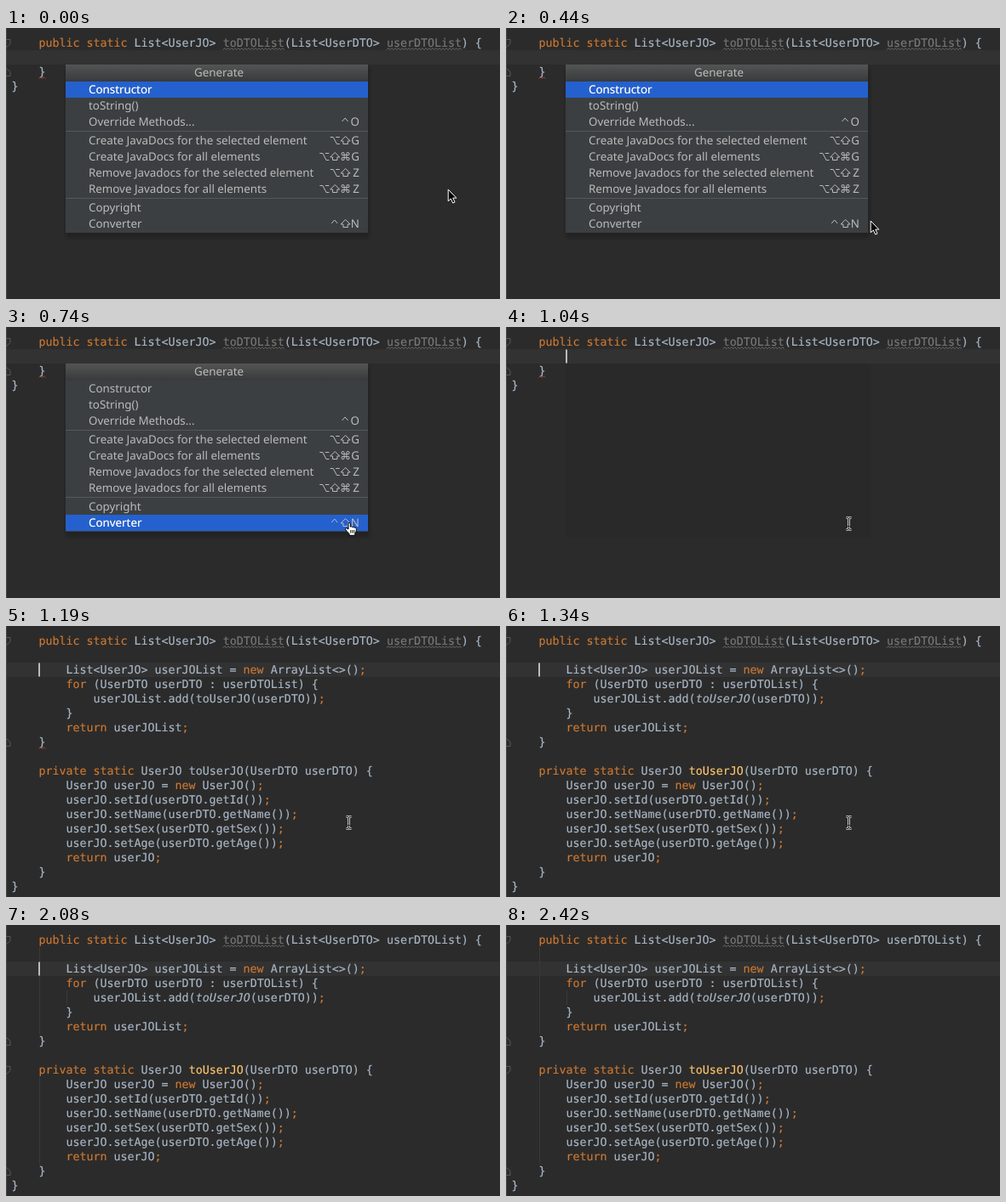
Animation of 580x319 px, one loop 2520 ms. Source, as an HTML page:

```html
<!DOCTYPE html>
<html lang="en">
<head>
<meta charset="utf-8">
<title>Generate converter</title>
<style>
html, body { margin: 0; width: 100%; height: 100%; overflow: hidden; background: #2b2b2b; }
svg { display: block; width: 580px; height: 319px; }
text { white-space: pre; text-rendering: geometricPrecision; }
.code { font: 13.305px "DejaVu Sans Mono", monospace; color: #a9b7c6; }
.code, .code .key { fill: currentColor; stroke: currentColor; stroke-width: .15; }
.code .key { color: #cc7832; }
.code.unused { color: #787878; }
.code.call { font-style: italic; }
.code.name { color: #ffc66d; }
.menu { font: 13.35px "Noto Sans", sans-serif; fill: #bbb; }
.sign { font: 13px "DejaVu Sans", sans-serif; fill: #bbb; text-anchor: middle; }
.end { text-anchor: end; }
.mid { text-anchor: middle; }
</style>
</head>
<body>
<svg id="stage" viewBox="0 0 580 319">
  <defs>
    <linearGradient id="bar" x2="0" y2="1">
      <stop stop-color="#535454"/><stop offset="1" stop-color="#393a3b"/>
    </linearGradient>
    <filter id="soft" x="-5%" y="-5%" width="110%" height="112%">
      <feGaussianBlur stdDeviation="1.5"/>
    </filter>
  </defs>
</svg>
<script>
const LOOP = 2520, LINE = 17, CHAR = 8.01;
const stage = document.getElementById('stage');

function add(parent, tag, attrs = {}, content) {
  const node = document.createElementNS('http://www.w3.org/2000/svg', tag);
  for (const key in attrs) node.setAttribute(key, attrs[key]);
  if (content !== undefined) node.textContent = content;
  parent.append(node);
  return node;
}

// A group that is visible only from start to end, with hard cuts.
function during(start, end = LOOP) {
  const group = add(stage, 'g');
  const steps = [[0, start === 0], [start, true], [end, false], [LOOP, end === LOOP]]
    .filter(([t], i) => i === 0 || i === 3 || (t > 0 && t < LOOP));
  group.animate(
    steps.map(([t, on]) => ({ offset: t / LOOP, opacity: +on, easing: 'step-end' })),
    { duration: LOOP, iterations: Infinity });
  return group;
}

const rect = (parent, x, y, width, height, fill, more) =>
  add(parent, 'rect', { x, y, width, height, fill, ...more });
const path = (parent, d, stroke, more) =>
  add(parent, 'path', { d, stroke, fill: 'none', ...more });
const colX = col => 6.4 + col * CHAR;
const rowY = row => 9 + row * LINE;

function code(parent, col, row, source, style = '') {
  const line = add(parent, 'text', { class: 'code ' + style, x: colX(col), y: rowY(row) + 13 });
  for (const part of source.split(/(\b(?:public|private|static|new|for|return)\b|;)/)) {
    if (/^(public|private|static|new|for|return|;)$/.test(part))
      add(line, 'tspan', { class: 'key' }, part);
    else line.append(part);
  }
}

function wave(parent, col, row, chars, color) {
  let d = `M${colX(col)} ${rowY(row) + 16.7}`;
  for (let i = 0; i < chars * CHAR / 4 - .1; i++) d += 'l2-2l2 2';
  path(parent, d, color, { 'stroke-width': .9 });
}

function unused(parent, col, word) {
  code(parent, col, 0, word, 'unused');
  wave(parent, col, 0, word.length, '#777');
}

function fold(parent, row, opening) {
  const y = rowY(row);
  path(parent, opening ? `M0 ${y + 4.5}H5v5L0 ${y + 14}` : `M0 ${y + 13.5}H5v-5L0 ${y + 4}`, '#585858');
}

function brokenBrace(parent, row) {
  wave(parent, 4, row, 1, '#bc3f3c');
}

const band = (parent, row) => rect(parent, 0, rowY(row), 580, LINE, '#323232');
const caret = (parent, x, row) => rect(parent, x, rowY(row) + .5, 2, LINE - 1, '#bbb');

// Current line and indent guides lie below the text.
band(during(0, 1190), 1);
band(during(1190), 2);
path(during(1630), 'M39.5 26V128M39.5 179V281M71.5 77V94', '#393939');

// Parts that stay for the whole loop
rect(stage, 0, 0, 1, 319, '#484848');
fold(stage, 0, true);
code(stage, 4, 0, 'public static List<UserJO> ' + ' '.repeat(9) + '(List<UserDTO> ' + ' '.repeat(11) + ') {');
unused(stage, 31, 'toDTOList');
unused(during(0, 1480), 55, 'userDTOList');
code(during(1480), 55, 0, 'userDTOList');

// Empty method
const empty = during(0, 1190);
code(empty, 4, 2, '}');
code(empty, 0, 3, '}');
brokenBrace(empty, 2);
fold(empty, 2, false);

// Generated code
const filled = during(1190);
[
  [8, 'List<UserJO> userJOList = new ArrayList<>();'],
  [8, 'for (UserDTO userDTO : userDTOList) {'],
  [12, 'userJOList.add(' + ' '.repeat(8) + '(userDTO));'],
  [8, '}'],
  [8, 'return userJOList;'],
  [4, '}'],
  [0, ''],
  [4, 'private static UserJO ' + ' '.repeat(8) + '(UserDTO userDTO) {'],
  [8, 'UserJO userJO = new UserJO();'],
  ...['Id', 'Name', 'Sex', 'Age'].map(p => [8, `userJO.set${p}(userDTO.get${p}());`]),
  [8, 'return userJO;'],
  [4, '}'],
  [0, '}']
].forEach(([col, source], i) => code(filled, col, i + 2, source));
fold(filled, 7, false);

const raw = during(1190, 1340);
code(raw, 27, 4, 'toUserJO');
code(raw, 26, 9, 'toUserJO');
brokenBrace(raw, 7);

const resolved = during(1340);
code(resolved, 27, 4, 'toUserJO', 'call');
code(resolved, 26, 9, 'toUserJO', 'name');

const folds = during(1630);
fold(folds, 9, true);
fold(folds, 16, false);

caret(during(1040, 1190), 70, 1);
caret(during(1190, 2420), 38, 2);

// Popup menu
rect(during(1040, 1190), 69, 43, 359, 205, '#000', { opacity: .03 });
const popup = during(0, 1040);
rect(popup, 70, 46, 357, 201, '#1c1c1c', { filter: 'url(#soft)', opacity: .55, rx: 4 });
rect(popup, 70, 43, 355, 198, '#3c3f41');
rect(popup, 70, 43, 355, 20, 'url(#bar)');
add(popup, 'text', { class: 'menu mid', x: 250, y: 57 }, 'Generate');
path(popup, 'M70 121.5H425M70 200.5H425', '#55585a');
rect(during(0, 590), 70, 63, 355, 19, '#2461ce');
rect(during(590, 1040), 70, 221, 355, 19, '#2461ce');

// Modifier key signs, drawn around x = 0 on the baseline
const signs = {
  '^': 'M-4-5L-.5-9L3-5',
  '⇧': 'M0-9.5L5.5-4H2.7V-.5H-2.7V-4H-5.5Z',
  '⌥': 'M-5.5-8.5H-2L2.2-.5H5.5M1-8.5H5.5'
};
const labels = during(0, 1040);
function item(y, label, keys = '') {
  const base = y + 14;
  add(labels, 'text', { class: 'menu', x: 97, y: base }, label);
  [...keys].reverse().forEach((key, i) => {
    const x = 411 - i * 12.4;
    if (signs[key]) path(labels, signs[key], '#bbb', { transform: `translate(${x} ${base})` });
    else if (key === '⌘') add(labels, 'text', { class: 'sign', x, y: base }, key);
    else add(labels, 'text', { class: 'menu end', x: 415, y: base }, key);
  });
}
item(63, 'Constructor');
item(82, 'toString()');
item(101, 'Override Methods...', '^O');
item(123, 'Create JavaDocs for the selected element', '⌥⇧G');
item(142, 'Create JavaDocs for all elements', '⌥⇧⌘G');
item(161, 'Remove Javadocs for the selected element', '⌥⇧Z');
item(180, 'Remove Javadocs for all elements', '⌥⇧⌘Z');
item(202, 'Copyright');
item(221, 'Converter', '^⇧N');
for (const [label, y, start, end] of [['Constructor', 77, 0, 590], ['Converter', 235, 590, 1040]])
  add(during(start, end), 'text', { class: 'menu', x: 97, y, style: 'fill:#fff' }, label);

// Mouse pointers
const pointers = {
  arrow(g) {
    path(g, 'M1.2 1V14.8L4.3 12 6.7 17 9 16 6.7 11.1H10.8Z', '#fff', { fill: '#000' });
  },
  hand(g) {
    path(g, 'M5 9V2Q6 .3 7.3 2V6.2Q8.6 5.2 9.8 6.6 11.2 5.8 12.2 7.2 14 6.6 14.4 8.6 14.5 12 12.8 13.8V16.3H6V14.4Q3 11.6 1.2 8.8 2.2 6.6 5 9Z',
      '#000', { fill: '#fff' });
    path(g, 'M7.7 10V13.5M9.7 10V13.5M11.7 10V13.5', '#000', { 'stroke-width': .9 });
  },
  beam(g) {
    const d = 'M1.5 1.5H3Q4.5 1.5 4.5 3V14Q4.5 15.5 3 15.5H1.5M7.5 1.5H6Q4.5 1.5 4.5 3M4.5 14Q4.5 15.5 6 15.5H7.5M3 11.5H6';
    path(g, d, '#e4e4e4', { 'stroke-width': 2.6 });
    path(g, d, '#111', { 'stroke-width': .9 });
  }
};
[
  ['arrow', 518, 189, 0, 150],
  ['arrow', 491, 212, 150, 290],
  ['arrow', 464, 220, 290, 440],
  ['arrow', 427, 226, 440, 590],
  ['arrow', 403, 229, 590, 740],
  ['hand', 397, 229, 740, 1040],
  ['beam', 398, 223, 1040, 1480],
  ['beam', 432, 300, 1480, 1630],
  ['beam', 518, 311, 1930, 2080]
].forEach(([kind, x, y, start, end]) =>
  pointers[kind](add(during(start, end), 'g', { transform: `translate(${x} ${y})` })));
</script>
</body>
</html>
```
